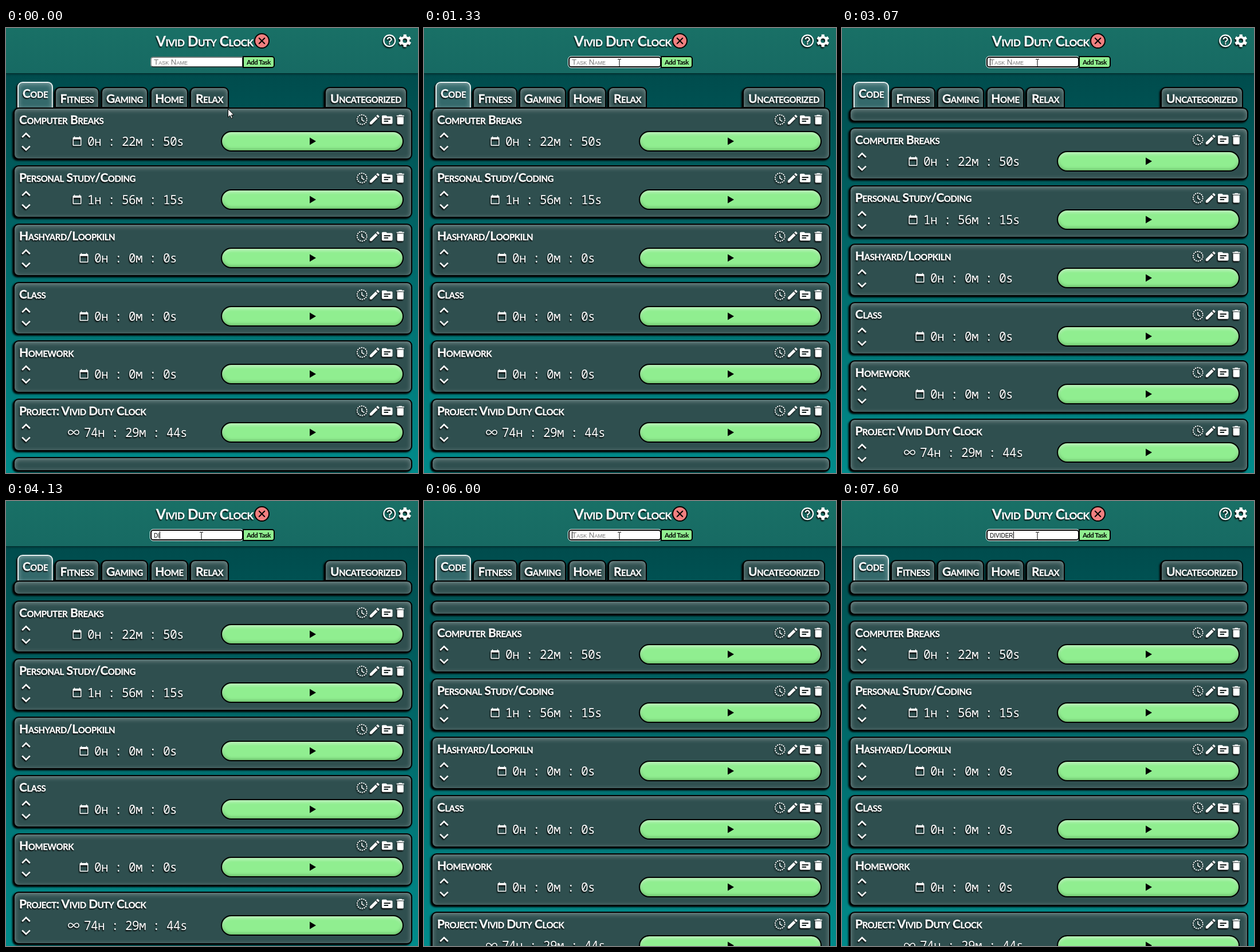
An HTML page that plays this animation: 719x778 px, repeating every 8 s.

```html
<!DOCTYPE html>
<html lang="en">
<head>
<meta charset="utf-8">
<title>Vivid Duty Clock</title>
<style>
* { box-sizing: border-box; }
html, body { margin: 0; width: 100%; height: 100%; overflow: hidden; }
body {
  position: relative;
  background: linear-gradient(#004646, #004d4e 12%, #008b8b);
  color: #fff;
  font: 700 21px/24px Lato, sans-serif;
  letter-spacing: -.45px;
  cursor: none;
}
svg { display: block; fill: #fff; overflow: visible; }
header, header > *, .tab, .list, .card > *, .pointer { position: absolute; }
header {
  left: 0; top: 0; width: 100%; height: 80px;
  background: linear-gradient(#197066, #176a63);
  border-bottom: 1px solid #022c2c;
  box-shadow: 0 1px 4px rgba(0, 0, 0, .4);
}
h1, .tab, .name, .clock { font-variant: small-caps; text-shadow: -1px 2px 2px #000; white-space: pre; }
h1, .tab, .name { -webkit-text-stroke: .3px #fff; }
h1 { left: 262px; top: 10px; margin: 0; font-size: 24.3px; line-height: 25px; }
.shade { filter: drop-shadow(-1px 2px 1px #000); }
.close {
  left: 433px; top: 9px; width: 27px; height: 27px;
  border: 2px solid #000; border-radius: 50%; background: #f08080;
}
.field {
  left: 252px; top: 50px; width: 162px; height: 19px; padding-left: 4px;
  border: 2px solid #2b3b3a; border-top-color: #6b7775; border-left-color: #8b9795;
  border-radius: 5px 0 0 5px; background: #fff; color: #000;
  font: 13.33px/15px "Liberation Sans", Arial, sans-serif; font-variant: small-caps; white-space: pre;
  letter-spacing: 0;
}
.field.focus { border-color: #000; outline: 1px solid #fff; border-radius: 5px; }
.typed { font-size: 14.3px; line-height: 1px; }
.caret { display: inline-block; width: 1px; height: 13px; margin-right: -1px; vertical-align: -2px; background: #000; }
.hint { color: #757575; }
.add {
  left: 413px; top: 49px; width: 56px; height: 21px;
  border: 2px solid #000; border-radius: 0 5px 5px 0; background: #90ee90; color: #000;
  font-size: 11.4px; line-height: 17px; text-align: center;
}
.add.hover { background: #b4f5b4; }
.tab, .card {
  border: 2px solid #000; background: #2f4f4f;
  box-shadow: -2px 2px 3px #000, inset 0 2px 9px rgba(255, 255, 255, .38);
}
.tab { top: 103px; height: 37px; border-radius: 9px 9px 0 0; line-height: 35px; text-align: center; }
.tab.on { top: 94px; height: 45px; border-color: #e6efef; border-bottom: 0; background: #34696b; line-height: 36px; }
.list { left: 13px; top: 138.5px; width: 696px; }
.card { position: relative; height: 91.85px; margin-bottom: 10px; border-radius: 9px; }
.card.bar { height: 25px; }
.name { left: 8px; top: 7px; }
.arrows { left: 12px; top: 41.5px; }
.clock {
  left: 47px; width: 300px; top: 46.5px; height: 22px;
  display: flex; justify-content: center; align-items: center; gap: 8px;
  font: 500 21px/22px "Noto Sans Mono", "DejaVu Sans Mono", monospace; font-variant: small-caps;
  letter-spacing: -.6px;
}
.tools { left: 594.5px; top: 8.5px; display: flex; }
.play {
  left: 360px; top: 39.5px; width: 319px; height: 36px;
  border: 2px solid #000; border-radius: 18px; background: #90ee90;
  box-shadow: inset 0 -2px 5px rgba(20, 80, 20, .35), inset 0 3px 5px rgba(255, 255, 255, .5);
}
.play svg { position: absolute; left: 152px; top: 9px; fill: #000; }
.pointer { left: 0; top: 0; }
</style>
</head>
<body>
<script>
const svg = (size, body, cls = "") =>
  `<svg class="${cls}" width="${size}" height="${size}" viewBox="0 0 24 24">${body}</svg>`;
const path = (d, extra = "") => `<path d="${d}" ${extra}/>`;
const line = (d, width, color = "#fff") =>
  path(d, `fill="none" stroke="${color}" stroke-width="${width}"`);
const ring = (r, width, extra = "") =>
  `<circle cx="12" cy="12" r="${r}" fill="none" stroke="#fff" stroke-width="${width}" ${extra}/>`;

const teeth = [0, 60, 120].map(a =>
  `<rect x="9.6" y="2" width="4.8" height="20" rx=".6" transform="rotate(${a} 12 12)"/>`).join("");
const gear = `<mask id="hole"><rect width="24" height="24" fill="#fff"/>
  <circle cx="12" cy="12" r="3.5" fill="#000"/></mask>
  <g mask="url(#hole)">${teeth}<circle cx="12" cy="12" r="7.4"/></g>`;
const help = ring(9, 2) + path("M11 18h2v-2h-2zM12 6c-2.2 0-4 1.8-4 4h2c0-1.1.9-2 2-2s2 .9 2 2c0 2-3 1.75-3 5h2c0-2.25 3-2.5 3-5 0-2.2-1.8-4-4-4z");

const tools = [
  ring(9, 2, 'stroke-dasharray="2.5 1.54"') + line("M11.8 7v5.6l4.6 2.8", 1.6),
  path("M3 17.25V21h3.75L17.8 9.94l-3.75-3.75zM20.7 7.04c.4-.4.4-1 0-1.4l-2.34-2.35c-.4-.4-1-.4-1.4 0l-1.83 1.83 3.75 3.75z"),
  path("M20 6h-8l-2-2H4q-2 0-2 2v12q0 2 2 2h16q2 0 2-2V8q0-2-2-2zm-6 10H6v-2h8zm4-4H6v-2h12z"),
  path("M6 19q0 2 2 2h8q2 0 2-2V7H6zM19 4h-3.5l-1-1h-5l-1 1H5v2h14z")
].map(icon => svg(22.4, icon, "shade")).join("");

const calendar = path("M20 3h-1V1h-2v2H7V1H5v2H4q-2 0-2 2v16q0 2 2 2h16q2 0 2-2V5q0-2-2-2zm0 18H4V8h16z",
  'transform="translate(1.2 1) scale(.9)"');
const infinity = line("M12 12C9.5 9 8 7.5 5.6 7.5a4.5 4.5 0 0 0 0 9C8 16.5 9.5 15 12 12S16 7.5 18.4 7.5a4.5 4.5 0 0 1 0 9C16 16.5 14.5 15 12 12z", 2);
const arrows = `<svg class="shade" width="16" height="34" viewBox="0 0 16 34">${
  line("M1.2 9L8 2.4 14.8 9M1.2 24.6L8 31.2 14.8 24.6", 2.7)}</svg>`;
const play = `<svg width="14" height="14">${path("M1 .5L12 7 1 13.5z")}</svg>`;

const bar = cls => `<div class="card bar ${cls}"></div>`;
const card = ([name, time, icon = calendar]) => `<div class="card">
  <div class="name">${name}</div>
  <div class="arrows">${arrows}</div>
  <div class="clock">${svg(20, icon, "shade")}<span>${time}</span></div>
  <div class="tools">${tools}</div>
  <div class="play">${play}</div>
</div>`;

const tabs = [["Code", 20, 62], ["Fitness", 85, 78], ["Gaming", 166, 82],
  ["Home", 252, 66], ["Relax", 321, 68], ["Uncategorized", 556, 144]];
const tasks = [
  ["Computer Breaks", "0h : 22m : 50s"],
  ["Personal Study/Coding", "1h : 56m : 15s"],
  ["Hashyard/Loopkiln", "0h : 0m : 0s"],
  ["Class", "0h : 0m : 0s"],
  ["Homework", "0h : 0m : 0s"],
  ["Project: Vivid Duty Clock", "74h : 29m : 44s", infinity]
];

document.body.insertAdjacentHTML("beforeend", `
<header>
  <h1>Vivid Duty Clock</h1>
  <div class="close">${svg(23, line("M6.5 6.5l11 11M17.5 6.5l-11 11", 2.1, "#000"))}</div>
  <div style="left:655.8px;top:9.3px">${svg(26.4, help, "shade")}</div>
  <div style="left:682.8px;top:9.3px">${svg(26.4, gear, "shade")}</div>
  <div class="field"><span class="typed"></span><i class="caret"></i><span class="hint">Task Name</span></div>
  <div class="add">Add Task</div>
</header>
${tabs.map(([name, x, w], i) =>
  `<div class="tab ${i ? "" : "on"}" style="left:${x}px;width:${w}px">${name}</div>`).join("")}
<div class="list">${bar("new")}${bar("new")}${tasks.map(card).join("")}${bar("")}</div>
<svg class="pointer" width="1" height="1">
  <g class="arrow">${path("M.5.5v14.6l3.4-3.2 2.3 5.4 2.3-1-2.3-5.2h4.4z", 'stroke="#000" stroke-width="1"')}</g>
  <g class="beam">${line("M-3 -6.5h2.5l.5.5.5-.5H3M0 -6V6.5M-3 7h2.5l.5-.5.5.5H3", 1, "#000")}</g>
</svg>`);

const LOOP = 8000;
const WORD = "divider";
// time, letters typed, caret visible
const typing = [
  [0, 0, 0], [800, 0, 1], [1330, 0, 0],
  [1600, 1, 1], [1670, 2, 1], [1730, 3, 1], [1870, 4, 1], [1930, 5, 1], [2130, 6, 1], [2270, 7, 1],
  [3070, 0, 1], [3330, 0, 0], [3870, 0, 1],
  [4000, 1, 1], [4130, 2, 1], [4270, 3, 1], [4330, 4, 1], [4470, 5, 1], [4600, 6, 1], [5130, 6, 0], [5270, 7, 1],
  [6000, 0, 1], [6270, 0, 0], [6800, 0, 1],
  [6930, 1, 1], [7130, 2, 1], [7200, 4, 1], [7330, 5, 1], [7470, 6, 1], [7600, 7, 1]
];
// time, x, y
const moves = [
  [0, 387, 141], [70, 371, 145], [130, 361, 146], [270, 366, 136], [330, 382, 112],
  [400, 404, 84], [470, 417, 62], [530, 390, 61], [600, 356, 61], [670, 341, 61]
];
const at = (keys, t) => keys.findLast(k => k[0] <= t);

const $ = s => document.querySelector(s);
const field = $(".field"), typed = $(".typed"), caret = $(".caret"), hint = $(".hint");
const add = $(".add"), pointer = $(".pointer"), arrow = $(".arrow"), beam = $(".beam");
const added = document.querySelectorAll(".new");
const show = (el, on) => { el.style.display = on ? "" : "none"; };

function draw(t) {
  const [, count, blink] = at(typing, t);
  typed.textContent = WORD.slice(0, count);
  show(hint, !count);
  show(caret, blink);
  field.classList.toggle("focus", t >= 730);

  show(added[0], t >= 3070);
  show(added[1], t >= 6000);

  const [, x, y] = at(moves, t);
  const inHeader = y > 48 && y < 70;
  const overField = inHeader && x < 413;
  add.classList.toggle("hover", inHeader && !overField);
  pointer.style.transform = `translate(${x}px, ${y}px)`;
  show(arrow, !overField);
  show(beam, overField);
}

const start = performance.now();
function tick() {
  draw((performance.now() - start) % LOOP);
  requestAnimationFrame(tick);
}
tick();
</script>
</body>
</html>
```
